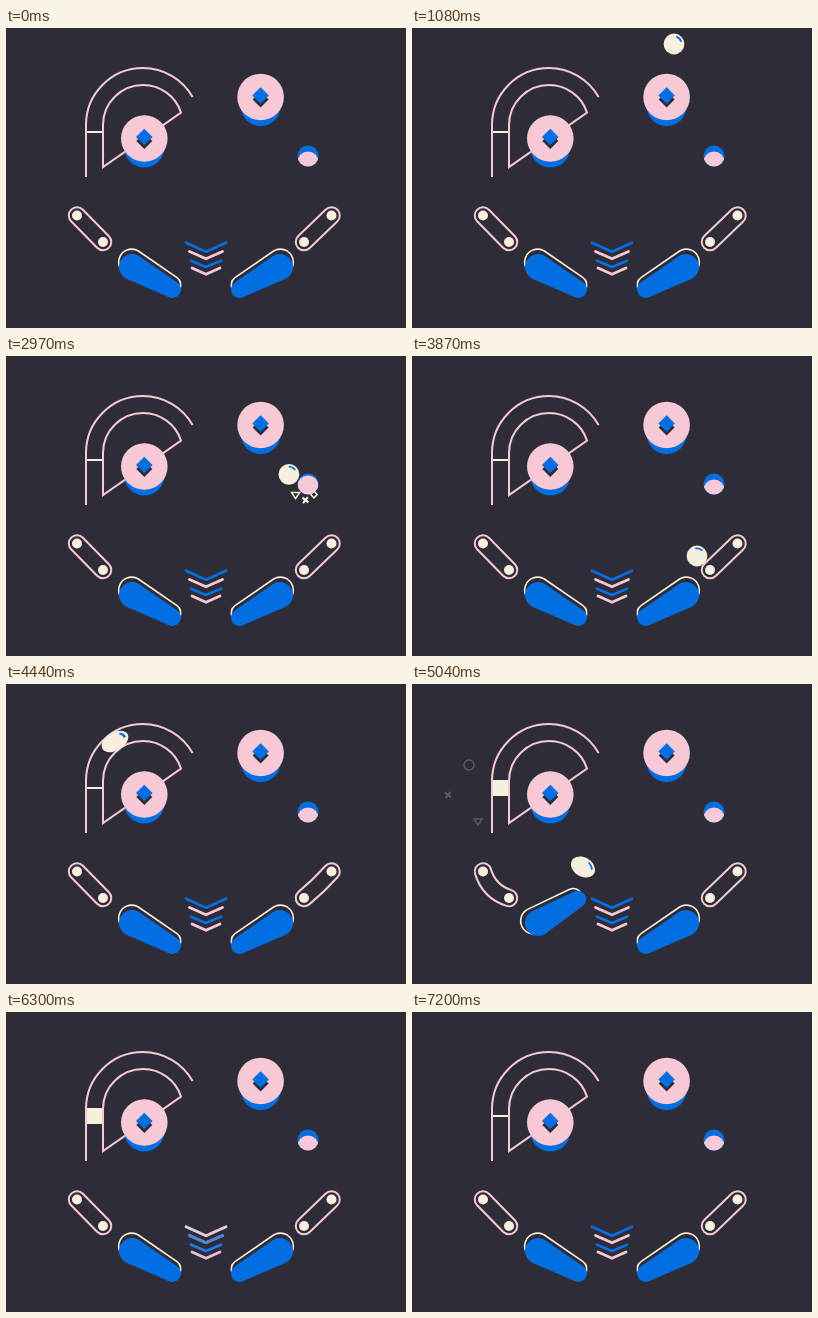
Animation of 400 by 300 pixels, one loop 7320 ms. Source, as an HTML page with a canvas:

```html
<!DOCTYPE html>
<html lang="en">
<head>
<meta charset="utf-8">
<title>Pinball</title>
<style>
html, body { margin: 0; width: 100%; height: 100%; overflow: hidden; background: #2e2c37; }
canvas { display: block; width: 400px; height: 300px; }
</style>
</head>
<body>
<canvas id="stage"></canvas>
<script>
const LOOP = 7320, STEP = 30, LAST = 7200;
const BG = '#2e2c37', BLUE = '#036de2', PINK = '#f7c8d5', CREAM = '#f8f0df';
const TAU = Math.PI * 2, RAD = Math.PI / 180;

const canvas = document.getElementById('stage');
const dpr = window.devicePixelRatio || 1;
canvas.width = 400 * dpr;
canvas.height = 300 * dpr;
const ctx = canvas.getContext('2d');

// time, x, y, upward bow, sideways bow of the stretch leading to this point
const PATH = [
  [60, 272, -14], [270, 278, 45], [690, 305.5, 107, 8], [1080, 262, 16, 15],
  [1420, 235, 41, 11.75], [2130, 287, 20, 10, 10], [2860, 284, 117, 19, 4],
  [3740, 284, 199, 20.5, -2.5], [3870, 285, 200], [4130, 232, 240, 6],
  [4180, 226, 195], [4330, 181, 76.5], [4500, 88.5, 97], [4720, 88.5, 178],
  [4850, 86, 181], [4960, 170, 240], [5010, 179, 188], [5040, 171, 183],
  [5250, 157, 139], [5520, 196, 247], [5700, 218, 314]
];
const LANE = { x: 137, y: 97, outer: 57, inner: 40, from: 4330, to: 4500 };
const SPIN = [[0, -45], [1080, -45], [2130, -50], [3870, -75], [5040, -15], [5520, 40], [5700, 60]];

const BURSTS = [
  { t: 1420, x: 240, y: 52, bits: [['x', 204, 43], ['o', 219, 18], ['v', 212, 76]] },
  { t: 2860, x: 296, y: 130, bits: [['d', 324, 150], ['x', 304, 163], ['v', 281, 152]] },
  { t: 4450, x: 84, y: 104, bits: [['o', 57, 81], ['x', 36, 111], ['v', 66, 138]] },
  { t: 5250, x: 150, y: 132, bits: [['x', 181, 114.5], ['d', 124, 153]] }
];

const clamp = (v, a = 0, b = 1) => Math.min(b, Math.max(a, v));
const lerp = (a, b, p) => a + (b - a) * p;
const smooth = p => p * p * (3 - 2 * p);
const ramp = (t, a, b) => smooth(clamp((t - a) / (b - a)));
const pulse = (t, at, len) => t > at && t < at + len ? Math.sin(Math.PI * (t - at) / len) : 0;
const wobble = (t, at) => t < at ? 0 : 10 * Math.exp(-(t - at) / 270) * Math.cos(TAU * (t - at) / 190);
const flip = (t, up, down) => ramp(t, up, up + 60) - ramp(t, down, down + 130);

function ballAt(t) {
  if (t >= LANE.from && t <= LANE.to) {
    const a = lerp(-25, -180, (t - LANE.from) / (LANE.to - LANE.from)) * RAD;
    return [LANE.x + 48.5 * Math.cos(a), LANE.y + 48.5 * Math.sin(a)];
  }
  let i = 1;
  while (i < PATH.length - 1 && t > PATH[i][0]) i++;
  const a = PATH[i - 1], b = PATH[i];
  const p = clamp((t - a[0]) / (b[0] - a[0]));
  const bow = 4 * p * (1 - p);
  return [lerp(a[1], b[1], p) + bow * (b[4] || 0), lerp(a[2], b[2], p) - bow * (b[3] || 0)];
}

function spinAt(t) {
  let i = 1;
  while (i < SPIN.length - 1 && t > SPIN[i][0]) i++;
  const a = SPIN[i - 1], b = SPIN[i];
  return lerp(a[1], b[1], clamp((t - a[0]) / (b[0] - a[0]))) * RAD;
}

function disc(x, y, r, color) {
  ctx.fillStyle = color;
  ctx.beginPath();
  ctx.arc(x, y, r, 0, TAU);
  ctx.fill();
}

function stroke(color, width) {
  ctx.strokeStyle = color;
  ctx.lineWidth = width;
  ctx.stroke();
}

function diamond(x, y, r) {
  ctx.beginPath();
  ctx.moveTo(x, y - r);
  ctx.lineTo(x + r, y);
  ctx.lineTo(x, y + r);
  ctx.lineTo(x - r, y);
  ctx.closePath();
}

function lane(t) {
  const open = ramp(t, 4490, 4600) - ramp(t, 6400, 7150);
  const h = 2 + 14 * open;
  ctx.fillStyle = CREAM;
  ctx.fillRect(80, 104 - h / 2, 17, h);
  ctx.lineCap = 'butt';
  ctx.lineJoin = 'miter';
  ctx.beginPath();
  ctx.moveTo(80, 149);
  ctx.lineTo(80, LANE.y);
  ctx.arc(LANE.x, LANE.y, LANE.outer, Math.PI, -29.5 * RAD);
  stroke(PINK, 2);
  ctx.beginPath();
  ctx.moveTo(97, 139);
  ctx.lineTo(97, LANE.y);
  ctx.arc(LANE.x, LANE.y, LANE.inner, Math.PI, -18 * RAD);
  ctx.closePath();
  stroke(PINK, 2);
}

function bumper(x, y, hit) {
  const top = y + 4 * hit;
  disc(x, y + 9, 20, BLUE);
  disc(x, top, 23.3, PINK);
  diamond(x, top + 2.5, 8);
  ctx.fillStyle = BG;
  ctx.fill();
  diamond(x, top - 1.5 + 2 * hit, 8.3);
  ctx.fillStyle = BLUE;
  ctx.fill();
}

function smallBumper(hit) {
  ctx.save();
  ctx.beginPath();
  ctx.arc(302, 128, 10.5, 0, TAU);
  ctx.clip();
  disc(302, 128, 12, BLUE);
  disc(302, 134 - 4 * hit, 10.5, PINK);
  ctx.restore();
}

// side: 1 for left, -1 for right
function sling(x1, x2, side, bend) {
  const y1 = 187.5, y2 = 214;
  ctx.lineCap = 'round';
  ctx.beginPath();
  ctx.moveTo(x1, y1);
  ctx.quadraticCurveTo((x1 + x2) / 2 - side * bend * 1.4, (y1 + y2) / 2 + bend * 1.4, x2, y2);
  stroke(PINK, 18.5);
  stroke(BG, 14.5);
  disc(x1, y1, 5, CREAM);
  disc(x2, y2, 5, CREAM);
}

function paddle() {
  const len = 46.3, R = 13, r = 8.5, a = Math.acos((R - r) / len);
  ctx.beginPath();
  ctx.arc(0, 0, R, a, -a);
  ctx.arc(len, 0, r, -a, a);
  ctx.closePath();
}

function flipper(side, up) {
  ctx.save();
  if (side < 0) {
    ctx.translate(400, 0);
    ctx.scale(-1, 1);
  }
  ctx.translate(126, 239);
  ctx.rotate(-60 * up * RAD);
  ctx.save();
  ctx.translate(-0.3, -4.8);
  ctx.rotate(29 * RAD);
  paddle();
  ctx.fillStyle = BG;
  ctx.fill();
  stroke(CREAM, 1.6);
  ctx.restore();
  ctx.rotate(29 * RAD);
  paddle();
  ctx.fillStyle = BLUE;
  ctx.fill();
  ctx.restore();
}

function chevrons(t) {
  const rows = [[20, 214.8, 9], [16.5, 223.5, 7.3], [15, 232.8, 6.2], [14, 240, 6.2]];
  ctx.lineCap = 'round';
  ctx.lineJoin = 'miter';
  rows.forEach(([w, y, d], i) => {
    const p = (t - 5640 - i * 90) / 430;
    const mix = p > 0 && p < 3 ? Math.sin(Math.PI * p) ** 2 : 0;
    const colors = i % 2 ? [PINK, BLUE] : [BLUE, PINK];
    ctx.beginPath();
    ctx.moveTo(200 - w, y);
    ctx.lineTo(200, y + d);
    ctx.lineTo(200 + w, y);
    stroke(colors[0], 2.8);
    if (mix > 0.001) {
      ctx.globalAlpha = mix;
      stroke(colors[1], 2.8);
      ctx.globalAlpha = 1;
    }
  });
}

function bit(kind, x, y) {
  ctx.lineCap = 'butt';
  ctx.lineJoin = 'miter';
  ctx.beginPath();
  if (kind === 'o') {
    ctx.arc(x, y, 5, 0, TAU);
  } else if (kind === 'd') {
    diamond(x, y, 3.3);
  } else if (kind === 'v') {
    ctx.moveTo(x - 4, y - 3);
    ctx.lineTo(x + 4, y - 3);
    ctx.lineTo(x, y + 3.2);
    ctx.closePath();
  } else {
    ctx.moveTo(x - 3, y - 2.4);
    ctx.lineTo(x + 3, y + 2.4);
    ctx.moveTo(x - 2.4, y + 3);
    ctx.lineTo(x + 2.4, y - 3);
  }
  stroke(CREAM, kind === 'x' ? 2.2 : 1.5);
}

function bursts(t) {
  for (const b of BURSTS) {
    const p = (t - b.t) / 650;
    if (p <= 0 || p >= 1) continue;
    const e = 1 - (1 - p) ** 3;
    ctx.globalAlpha = clamp((1 - p) / 0.4);
    for (const [kind, x, y] of b.bits) bit(kind, lerp(b.x, x, e), lerp(b.y, y, e));
    ctx.globalAlpha = 1;
  }
}

function ball(t) {
  if (t < PATH[0][0] || t > PATH[PATH.length - 1][0]) return;
  const [x, y] = ballAt(t), [px, py] = ballAt(t - 10);
  const speed = Math.hypot(x - px, y - py) * 100;
  const s = clamp((speed - 150) / 700, 0, 0.4);
  const dir = Math.atan2(y - py, x - px), spin = spinAt(t);
  ctx.save();
  ctx.translate(x, y);
  ctx.rotate(dir);
  ctx.scale(1 + s, 1 - s / 3);
  ctx.rotate(-dir);
  disc(0, 0, 10.4, CREAM);
  ctx.lineCap = 'round';
  ctx.beginPath();
  ctx.arc(0, 0, 7.6, spin - 0.4, spin + 0.4);
  stroke(BLUE, 1.8);
  ctx.restore();
}

function draw(t) {
  ctx.setTransform(dpr, 0, 0, dpr, 0, 0);
  ctx.fillStyle = BG;
  ctx.fillRect(0, 0, 400, 300);
  lane(t);
  bursts(t);
  bumper(138.3, 110.5, pulse(t, 5240, 240));
  bumper(254.6, 69, pulse(t, 260, 260) + pulse(t, 1410, 260));
  smallBumper(pulse(t, 680, 260) + pulse(t, 2850, 260));
  sling(71, 97, 1, 4 * ramp(t, 4720, 4850) * (t < 4850) + wobble(t, 4850) * (t < 5450));
  sling(325.5, 298, -1, wobble(t, 3900) * (t < 4700));
  flipper(1, flip(t, 4950, 5100) + flip(t, 5550, 5680));
  flipper(-1, flip(t, 4120, 4260) + flip(t, 5550, 5680));
  chevrons(t);
  ball(t);
}

const start = performance.now();
function tick() {
  const t = (performance.now() - start) % LOOP;
  draw(Math.min(LAST, Math.floor(t / STEP) * STEP));
  requestAnimationFrame(tick);
}
tick();
</script>
</body>
</html>
```
